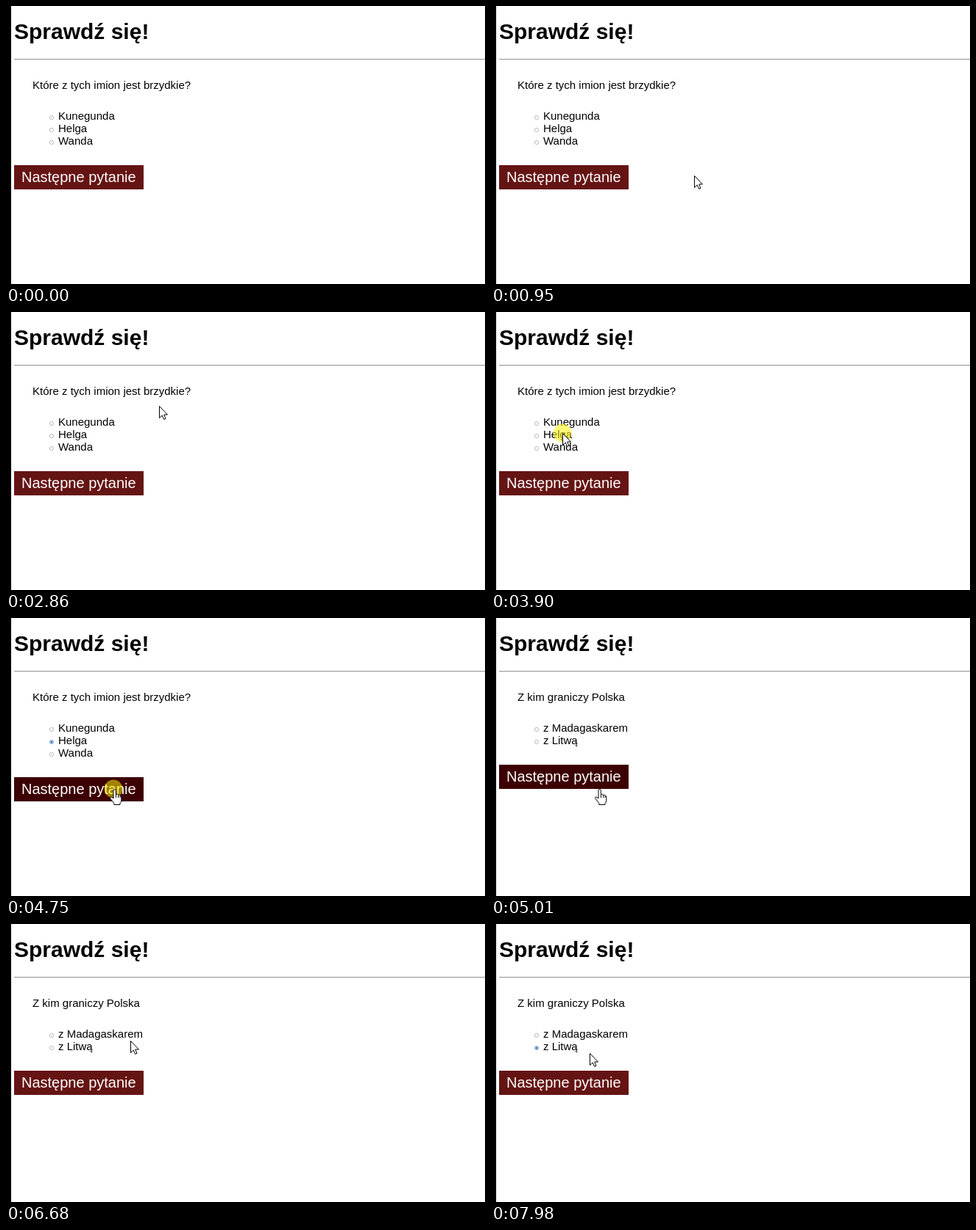
Recreate the animation shown at these times as an HTML page. Size 651x379 px, loop 8000 ms.

```html
<!DOCTYPE html>
<html lang="pl">
<head>
<meta charset="utf-8">
<title>Quiz</title>
<style>
  html, body { margin: 0; width: 100%; height: 100%; overflow: hidden; background: #fff; }
  svg { display: block; width: 651px; height: 379px; }
  text { font: 15px "Liberation Sans", Arial, sans-serif; white-space: pre; }
  .title { font-size: 30px; font-weight: bold; }
  .button rect { fill: #651414; }
  .button.hover rect { fill: #3c0003; }
  .button text { font-size: 20px; fill: #fff; }
  .ring { fill: #fff; stroke: #bcbcbc; }
  .dot { fill: none; }
  .checked .ring { fill: #dce9f8; stroke: #86abd8; }
  .checked .dot { fill: #3f78c4; }
  #halo { fill: #fff500; opacity: .53; }
  #pointer path { fill: #fff; stroke: #000; stroke-linejoin: round; }
  #pointer .beam { fill: none; }
</style>
</head>
<body>
<svg viewBox="0 0 651 379">
  <rect width="7" height="379"/>
  <text class="title" x="11" y="45">Sprawdź się!</text>
  <rect x="11" y="72" width="640" height="1" fill="#9a9a9a"/>
  <rect x="11" y="73" width="640" height="1" fill="#eee"/>
  <g id="quiz"></g>
  <circle id="halo" r="12.5"/>
  <g id="pointer">
    <path class="arrow" d="M.5 .5V16.5L4.2 13L6.6 18.4L9 17.4L6.7 12H11.5Z"/>
    <path class="hand" d="M0 13V2.2Q0 .5 1.6 .5T3.3 2.2V7.5Q6 6.3 6.6 8.3Q9 7.6 9.4 9.4Q10.8 9 10.8 11V16Q10.8 18 9 19.5V21.5H.8V19.5L-4 13.5Q-5 12-3.8 11.2T0 13M3.5 8V12M6.6 8.5V12M9 9.5V12"/>
    <path class="beam" d="M-3.5-7.5H-1.5L0-6.5L1.5-7.5H3.5M0-6.5V6.5M-3.5 7.5H-1.5L0 6.5L1.5 7.5H3.5"/>
  </g>
</svg>
<script>
const LOOP = 8000, TICK = 68.8, ENTER = 664, NEXT_QUESTION = 4810;
const CLICK_LENGTH = 70, CLICKS = [3895, 4740, 7705];

const questions = [
  { text: "Które z tych imion jest brzydkie?", right: 251, answers: ["Kunegunda", "Helga", "Wanda"], pickedAt: CLICKS[0] + CLICK_LENGTH },
  { text: "Z kim graniczy Polska", right: 182, answers: ["z Madagaskarem", "z Litwą"], pickedAt: CLICKS[2] + CLICK_LENGTH }
];
const PICK = 1;

// pointer stops: arrival time, x, y, rest
const stops = [
  [670, 439, 366], [950, 276, 231, 140], [1360, 165, 133], [1640, 73, 121],
  [2400, 228, 111], [2660, 210, 127, 70], [3700, 97, 165, 270],
  [4600, 146, 233, 410], [5280, 252, 94], [5490, 137, 104], [5770, 77, 106, 280],
  [6530, 193, 150], [6660, 169, 159], [7310, 100, 167, 470], [7967, 134, 176]
];
const keys = stops.flatMap(([t, x, y, rest]) => rest ? [[t, x, y], [t + rest, x, y]] : [[t, x, y]]);

const quiz = document.getElementById("quiz");
const halo = document.getElementById("halo");
const pointer = document.getElementById("pointer");
const between = (v, a, b) => v >= a && v < b;
const show = (el, on) => el.setAttribute("visibility", on ? "visible" : "hidden");

for (const q of questions) {
  q.buttonY = 166 + 17 * q.answers.length;
  const rows = q.answers.map((label, i) => `<g class="answer" transform="translate(0 ${17 * i})">
    <circle class="ring" cx="62" cy="152" r="2.6"/><circle class="dot" cx="62" cy="152" r="1.5"/>
    <text x="71" y="155">${label}</text></g>`).join("");
  quiz.insertAdjacentHTML("beforeend", `<g><text x="36" y="113">${q.text}</text>${rows}
    <g class="button"><rect x="11" y="${q.buttonY}" width="176" height="33"/>
    <text x="21" y="${q.buttonY + 23}">Następne pytanie</text></g></g>`);
  q.group = quiz.lastElementChild;
  q.picked = q.group.querySelectorAll(".answer")[PICK];
  q.button = q.group.querySelector(".button");
}

const slope = (i, axis) => keys[i] && keys[i + 1]
  ? (keys[i + 1][axis] - keys[i][axis]) / (keys[i + 1][0] - keys[i][0]) : 0;

// harmonic mean: the curve stops at rests and turns without overshooting
function speed(i, axis) {
  const a = slope(i - 1, axis), b = slope(i, axis);
  return a * b > 0 ? 2 * a * b / (a + b) : 0;
}

function pointerAt(t) {
  const last = keys.length - 1;
  if (t >= keys[last][0]) return keys[last].slice(1);
  const i = Math.max(0, keys.findIndex(key => key[0] > t) - 1);
  const span = keys[i + 1][0] - keys[i][0];
  const u = Math.max(0, (t - keys[i][0]) / span), v = 1 - u;
  return [1, 2].map(axis => Math.round(
    v * v * (1 + 2 * u) * keys[i][axis] + u * u * (3 - 2 * u) * keys[i + 1][axis]
    + span * u * v * (v * speed(i, axis) - u * speed(i + 1, axis))));
}

function draw(t) {
  const tick = ENTER + TICK * Math.floor((t - ENTER) / TICK) + 10;
  const [x, y] = pointerAt(tick);
  const visible = t >= ENTER;
  const q = questions[t < NEXT_QUESTION ? 0 : 1];

  for (const item of questions) item.group.setAttribute("display", item === q ? "inline" : "none");
  q.picked.classList.toggle("checked", t >= q.pickedAt);

  const onButton = visible && between(x, 11, 187) && between(y, q.buttonY, q.buttonY + 34);
  const onText = between(x, 36, q.right) && between(y, 99, 118);
  q.button.classList.toggle("hover", onButton);

  const kind = onButton ? "hand" : onText ? "beam" : "arrow";
  for (const shape of pointer.children)
    show(shape, visible && shape.classList.contains(kind));
  pointer.setAttribute("transform", `translate(${x} ${y})`);
  halo.setAttribute("cx", x);
  halo.setAttribute("cy", y);
  show(halo, CLICKS.some(at => between(t, at, at + CLICK_LENGTH)));
}

const start = performance.now();
function frame() {
  draw((performance.now() - start) % LOOP);
  requestAnimationFrame(frame);
}
frame();
</script>
</body>
</html>
```
